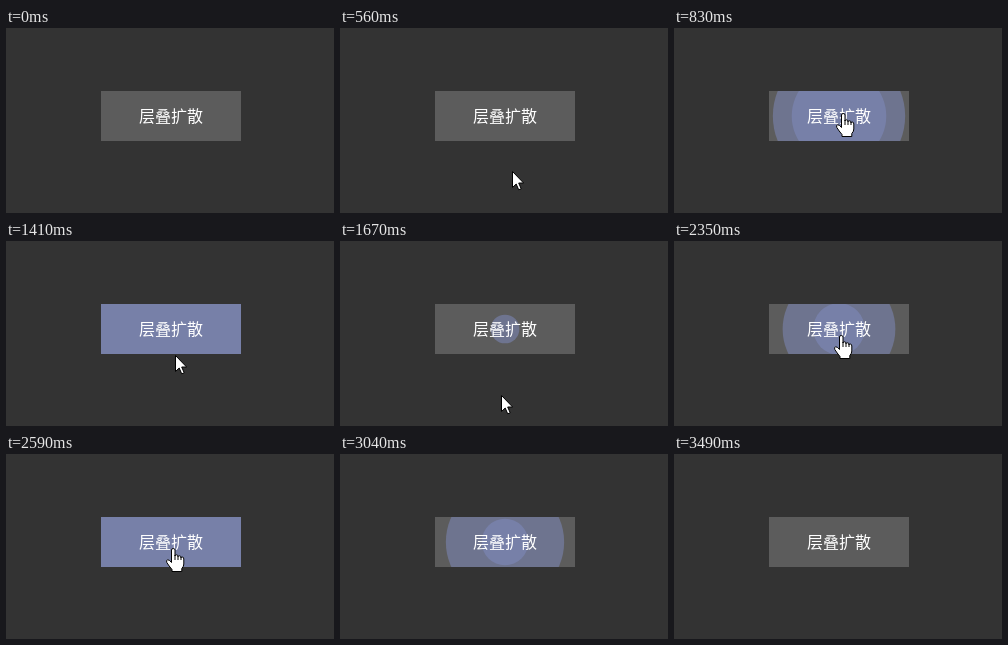
These frames come from a looping animation (328x185 px, 3.9 s). An HTML page:

```html
<!DOCTYPE html>
<html lang="zh-CN">
<head>
<meta charset="utf-8">
<title>层叠扩散</title>
<style>
  html, body { margin: 0; width: 100%; height: 100%; overflow: hidden; background: #333; }
  svg { display: block; width: 328px; height: 185px; }
  text { font: 16px "Noto Sans CJK SC", "Noto Sans CJK", sans-serif; fill: #fff; text-anchor: middle; }
  .ripple { fill: rgb(128, 140, 194); fill-opacity: .5; }
  .cursor { fill: #fff; stroke: #000; stroke-width: 1; stroke-linejoin: round; }
</style>
</head>
<body>
<svg viewBox="0 0 328 185">
  <clipPath id="face"><rect x="95" y="63" width="140" height="50"/></clipPath>
  <rect x="95" y="63" width="140" height="50" fill="#5c5c5c"/>
  <g clip-path="url(#face)">
    <circle class="ripple" cx="165" cy="88" r="0"/>
    <circle class="ripple" cx="165" cy="88" r="0"/>
  </g>
  <text x="165" y="94">层叠扩散</text>
  <path id="arrow" class="cursor" d="M.5 .5V16.5L4.2 13L6.7 18.8L9.2 17.8L6.7 12H11.6Z"/>
  <g id="hand" class="cursor">
    <path d="M-1.5 14.5V2Q-1.5 .5 .2 .5Q2 .5 2 2V8Q2 6.8 3.5 6.8Q5 6.8 5 8.6Q5 7.8 6.5 7.8Q8 7.8 8 9.8Q8 9 9.2 9Q10.8 9 10.8 11V16Q10.8 18.5 8.8 20.5V23.5H-1V21.5Q-4 18 -6.2 14.5Q-7.2 12 -5.2 11.8Q-3.5 11.8 -1.5 14.5Z"/>
    <path d="M2 7V12M5 8V12M8 9V12" fill="none"/>
  </g>
</svg>
<script>
const LOOP = 3900, RADIUS = 100;

// The picture is only refreshed at these moments.
const ticks = [0, 560, 680, 830, 980, 1130, 1410, 1530, 1670, 1810, 1930,
  2220, 2340, 2470, 2590, 3040, 3190, 3360, 3490];

const hovers = [{ on: 641, off: 1356 }, { on: 2180, off: 2900 }];

// The second layer starts later and moves faster; it leaves without delay.
const layers = [
  { delay: 0, enter: 490, leave: 560 },
  { delay: 105, enter: 300, leave: 300 }
];

// time, cursor shape, x, y
const pointer = [
  [0, ''],
  [560, 'arrow', 172, 143],
  [680, 'hand', 170, 99],
  [830, 'hand', 169, 85],
  [1410, 'arrow', 169, 114],
  [1530, 'arrow', 167, 139],
  [1670, 'arrow', 161, 154],
  [2220, 'hand', 169, 101],
  [2340, 'hand', 167, 94],
  [3040, '']
];

const ripples = document.querySelectorAll('.ripple');
const cursors = ['arrow', 'hand'].map(id => document.getElementById(id));

// cubic-bezier(.25, .1, .25, 1)
function ease(x) {
  if (x <= 0) return 0;
  if (x >= 1) return 1;
  const bez = (a, b, s) => 3 * a * s * (1 - s) ** 2 + 3 * b * s * s * (1 - s) + s ** 3;
  let lo = 0, hi = 1;
  for (let i = 0; i < 24; i++) {
    const mid = (lo + hi) / 2;
    if (bez(.25, .25, mid) < x) lo = mid; else hi = mid;
  }
  return bez(.1, 1, lo);
}

function radius(t, { delay, enter, leave }) {
  const spread = hovers.reduce((sum, h) =>
    sum + ease((t - h.on - delay) / enter) - ease((t - h.off) / leave), 0);
  return Math.max(0, RADIUS * spread);
}

function draw(now) {
  const time = now % LOOP;
  const t = ticks.filter(v => v <= time).pop();
  ripples.forEach((c, i) => c.setAttribute('r', radius(t, layers[i]).toFixed(2)));
  const [, shape, x, y] = pointer.filter(p => p[0] <= t).pop();
  for (const el of cursors) {
    const shown = el.id === shape;
    el.setAttribute('visibility', shown ? 'visible' : 'hidden');
    if (shown) el.setAttribute('transform', `translate(${x} ${y})`);
  }
}

const start = performance.now();
function loop() {
  draw(performance.now() - start);
  requestAnimationFrame(loop);
}
loop();
</script>
</body>
</html>
```
